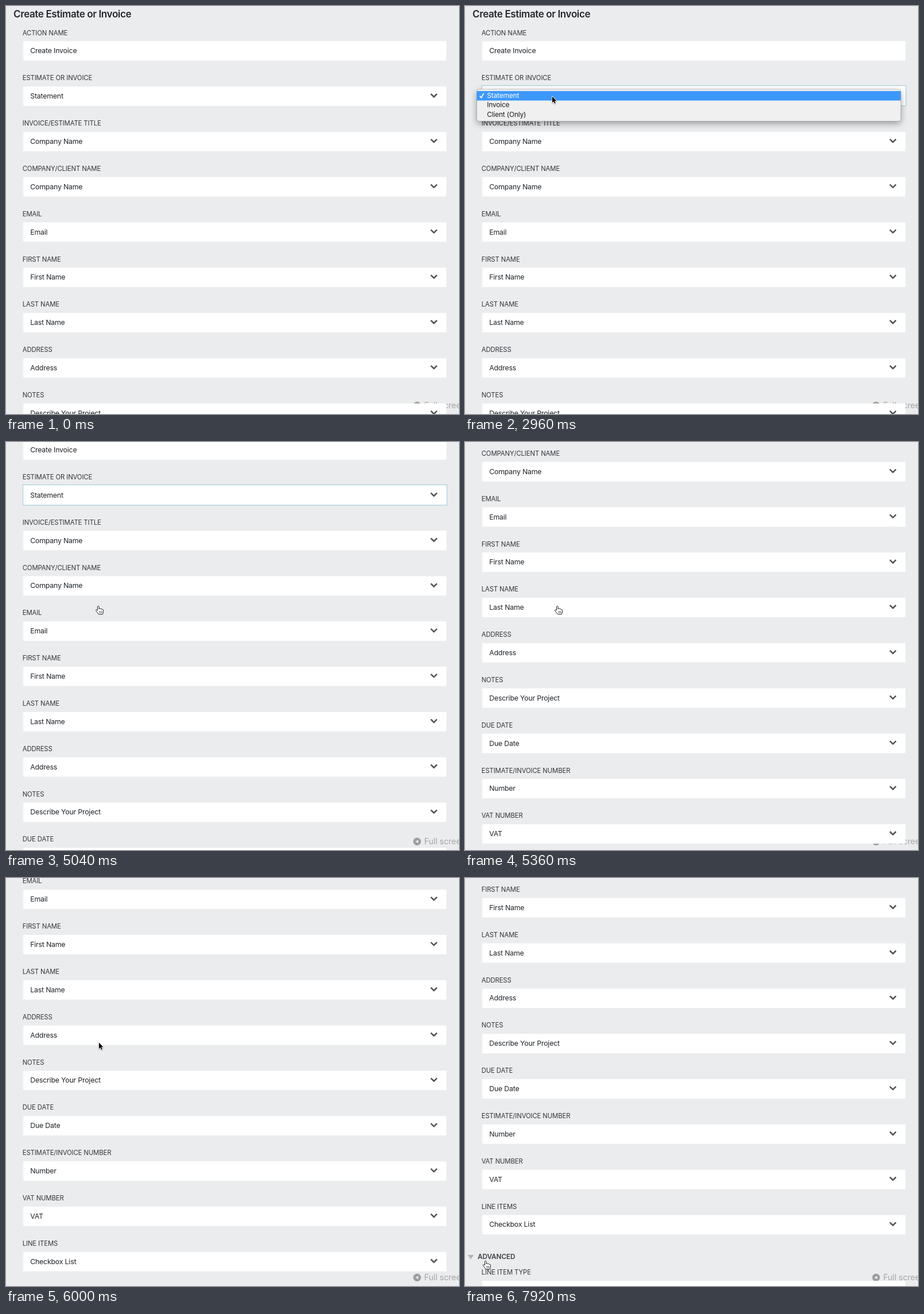
Recreate the animation shown at these times as an HTML page with a canvas. Size 789 by 710 pixels, loop 8 s.

```html
<!DOCTYPE html>
<html lang="en">
<head>
<meta charset="utf-8">
<title>Create Estimate or Invoice</title>
<style>
html, body { margin: 0; width: 100%; height: 100%; overflow: hidden; background: #ebecee; }
canvas { display: block; width: 789px; height: 710px; }
</style>
</head>
<body>
<canvas id="stage"></canvas>
<script>
const W = 789, H = 710, LOOP = 8000, STEP = 80, PITCH = 78.8;
const BG = '#ebecee', INK = '#1f2328';
const canvas = document.getElementById('stage');
const ctx = canvas.getContext('2d');
const ratio = window.devicePixelRatio || 1;
canvas.width = W * ratio;
canvas.height = H * ratio;

const fields = [
  ['ACTION NAME', 'Create Invoice'],
  ['ESTIMATE OR INVOICE', 'Statement'],
  ['INVOICE/ESTIMATE TITLE', 'Company Name'],
  ['COMPANY/CLIENT NAME', 'Company Name'],
  ['EMAIL', 'Email'],
  ['FIRST NAME', 'First Name'],
  ['LAST NAME', 'Last Name'],
  ['ADDRESS', 'Address'],
  ['NOTES', 'Describe Your Project'],
  ['DUE DATE', 'Due Date'],
  ['ESTIMATE/INVOICE NUMBER', 'Number'],
  ['VAT NUMBER', 'VAT'],
  ['LINE ITEMS', 'Checkbox List']
];
const options = ['Statement', 'Invoice', 'Client (Only)'];

// Event times
const FOCUS = 1600, OPEN = 2640, CLOSE = 4480, EXPAND = 7600;

const linear = u => u;
const easeOut = u => u * (2 - u);
const easeInOut = u => u * u * (3 - 2 * u);

// Keys: [time, value, ..., easing of the segment that ends here]
const scrollKeys = [
  [4880, 0], [4960, 2, linear], [5040, 64.3, linear], [5360, 263, linear],
  [5760, 355, easeOut], [5840, 355, linear], [6000, 356.3, linear], [6080, 420.5, linear]
];
const pointerKeys = [
  [240, 431, 668], [720, 230, 122, easeOut], [960, 230, 122, linear],
  [1280, 167, 89, easeOut], [1520, 167, 89, linear], [1760, 137, 79, easeOut],
  [2160, 137, 79, linear], [2960, 151, 157, easeOut], [3200, 151, 157, linear],
  [4080, 158, 242, easeInOut], [4160, 158, 242, linear], [4960, 161, 286, easeInOut],
  [6560, 161, 286, linear], [6880, 34, 644, easeInOut], [6960, 34, 644, linear],
  [7200, 22, 667, easeInOut], [7440, 5, 652, easeInOut], [7520, 5, 652, linear],
  [7600, 13, 657, linear], [7680, 13, 657, linear], [7920, 36, 667, easeOut]
];

function at(keys, t, i) {
  if (t <= keys[0][0]) return keys[0][i];
  for (let k = 1; k < keys.length; k++) {
    const a = keys[k - 1], b = keys[k];
    if (t <= b[0]) {
      const ease = b[b.length - 1];
      return a[i] + (b[i] - a[i]) * ease((t - a[0]) / (b[0] - a[0]));
    }
  }
  return keys[keys.length - 1][i];
}

function text(str, x, y, size, color, spacing, weight = 400) {
  ctx.font = `${weight} ${size}px Inter, sans-serif`;
  ctx.letterSpacing = spacing + 'px';
  ctx.fillStyle = color;
  ctx.fillText(str, x, y + size * 0.35);
}

function poly(points, color) {
  ctx.beginPath();
  points.forEach(([x, y]) => ctx.lineTo(x, y));
  ctx.closePath();
  ctx.fillStyle = color;
  ctx.fill();
}

function line(points, color, width) {
  ctx.beginPath();
  points.forEach(([x, y]) => ctx.lineTo(x, y));
  ctx.strokeStyle = color;
  ctx.lineWidth = width;
  ctx.stroke();
}

function box(y, focused, select) {
  ctx.fillStyle = '#f4f5f6';
  ctx.fillRect(29, y, 738, 33.6);
  ctx.fillStyle = '#fff';
  ctx.fillRect(31, y, 736, 33.6);
  if (focused) {
    const top = Math.round(y) - 1.5;
    ctx.fillRect(29, top, 739, 35);
    ctx.strokeStyle = '#a8d0dc';
    ctx.lineWidth = 1.2;
    ctx.strokeRect(29.5, top, 738.5, 35.5);
  }
  if (select) {
    line([[740, y + 12.8], [745.3, y + 18], [750.6, y + 12.8]], '#505356', 2.5);
  }
}

function label(str, y) {
  text(str, 28.7, y, 11.3, '#32363a', -0.1);
}

function fullScreen() {
  ctx.beginPath();
  ctx.arc(716, 695.3, 6.7, 0, Math.PI * 2);
  ctx.fillStyle = '#9c9d9f';
  ctx.fill();
  poly([[713, 695.3], [718, 692.3], [718, 698.3]], BG);
  text('Full screen', 728.5, 695, 14, '#a4a5a7', 0);
}

function form(t, scroll) {
  text('Create Estimate or Invoice', 13, 13.7 - scroll, 17, '#23282d', -0.38, 600);
  const focus = t < FOCUS ? -1 : t < OPEN ? 0 : t < 5840 ? 1 : -1;
  fields.forEach(([name, value], i) => {
    const y = i * PITCH - scroll;
    if (y < -110 || y > H) return;
    label(name, y + 46.6);
    box(y + 61.4, i === focus, i > 0);
    text(value, 42.2, y + 78, 12.3, INK, -0.18);
  });
  advanced(1079.5 - scroll, t >= EXPAND);
}

function advanced(y, open) {
  if (y > H + 20) return;
  poly(open ? [[5, y - 3], [15, y - 3], [10, y + 4.5]]
            : [[7, y - 5], [14, y], [7, y + 5]], '#b0b2b4');
  text('ADVANCED', 22, y, 11.8, '#3c4146', -0.1, 600);
  if (open) {
    label('LINE ITEM TYPE', y + 27.2);
    box(y + 42.2, false, true);
  }
}

function menu(pointerY) {
  ctx.save();
  ctx.shadowColor = 'rgba(0,0,0,0.36)';
  ctx.shadowBlur = 12;
  ctx.shadowOffsetY = 4;
  ctx.beginPath();
  ctx.roundRect(20.5, 145, 738.5, 55.5, 4);
  ctx.fillStyle = '#f0f0f0';
  ctx.fill();
  ctx.restore();
  ctx.strokeStyle = 'rgba(0,0,0,0.28)';
  ctx.lineWidth = 0.7;
  ctx.stroke();

  const row = Math.floor((pointerY - 148) / 16.3);
  if (options[row]) {
    ctx.fillStyle = '#3d98fc';
    ctx.fillRect(20.5, Math.round(148 + row * 16.3), 738.5, 16.5);
  }
  options.forEach((name, i) => {
    const color = i === row ? '#fff' : '#1c1c1c';
    text(name, 38.2, 156 + i * 16.2, 12, color, -0.2);
    if (i === 0) line([[25.7, 156.5], [28.2, 159.5], [32.7, 152]], color, 1.6);
  });
}

const arrow = new Path2D('M0 0V12L2.8 9.5L4.7 13.8L6.6 13L4.8 8.8H8.5Z');
const hand = new Path2D('M-1.6 7.2V.8Q-1.6-.6-.3-.6T1.1.8V4.6Q1.3 3.5 2.5 3.6T3.8 4.9' +
  'Q4.2 4 5.3 4.3T6.3 5.6Q7 5 7.8 5.5T8.5 7V9.8L7.3 13.8H.2L-2.2 10.4L-4.4 7.5' +
  'Q-4.9 6.4-3.8 5.8T-1.6 7.2Z');
const folds = new Path2D('M1.8 8.3V11.6M3.8 8.3V11.6M5.8 8.3V11.6');
const beam = new Path2D('M-3-7.5Q0-7.5 0-5.5Q0-7.5 3-7.5M0-5.5V5.5M-3 7.5Q0 7.5 0 5.5Q0 7.5 3 7.5');

function pointerKind(t, y) {
  if (t < OPEN) {
    const i = Math.floor((y - 61.4) / PITCH);
    const inside = i >= 0 && y - 61.4 - i * PITCH < 34;
    return !inside ? 'arrow' : i === 0 ? 'beam' : 'hand';
  }
  if (t < CLOSE) return 'arrow';
  return t >= 5840 && t < 6080 ? 'arrow' : 'hand';
}

function pointer(t) {
  if (t < 240) return;
  const x = at(pointerKeys, t, 1), y = at(pointerKeys, t, 2);
  const kind = pointerKind(t, y);
  ctx.save();
  ctx.translate(x, y);
  ctx.lineJoin = 'round';
  if (kind === 'beam') {
    ctx.strokeStyle = '#222';
    ctx.lineWidth = 1;
    ctx.stroke(beam);
  } else if (kind === 'arrow') {
    ctx.translate(0.9, 0.6);
    ctx.scale(0.88, 0.88);
    ctx.shadowColor = 'rgba(0,0,0,0.3)';
    ctx.shadowBlur = 2;
    ctx.shadowOffsetY = 1;
    ctx.strokeStyle = '#fff';
    ctx.lineWidth = 1.8;
    ctx.stroke(arrow);
    ctx.shadowColor = 'transparent';
    ctx.fillStyle = '#000';
    ctx.fill(arrow);
  } else {
    ctx.fillStyle = '#fff';
    ctx.fill(hand);
    ctx.strokeStyle = '#222';
    ctx.lineWidth = 1;
    ctx.stroke(hand);
    ctx.lineWidth = 0.8;
    ctx.stroke(folds);
  }
  ctx.restore();
}

function draw(now) {
  const t = Math.floor((now % LOOP) / STEP) * STEP;
  ctx.setTransform(ratio, 0, 0, ratio, 0, 0);
  ctx.fillStyle = BG;
  ctx.fillRect(0, 0, W, H);
  fullScreen();
  form(t, at(scrollKeys, t, 1));
  if (t >= OPEN && t < CLOSE) menu(at(pointerKeys, t, 2));
  pointer(t);
}

let start;
function tick(now) {
  if (start === undefined) start = now;
  draw(Math.max(0, now - start));
  requestAnimationFrame(tick);
}
draw(0);
requestAnimationFrame(tick);
</script>
</body>
</html>
```
